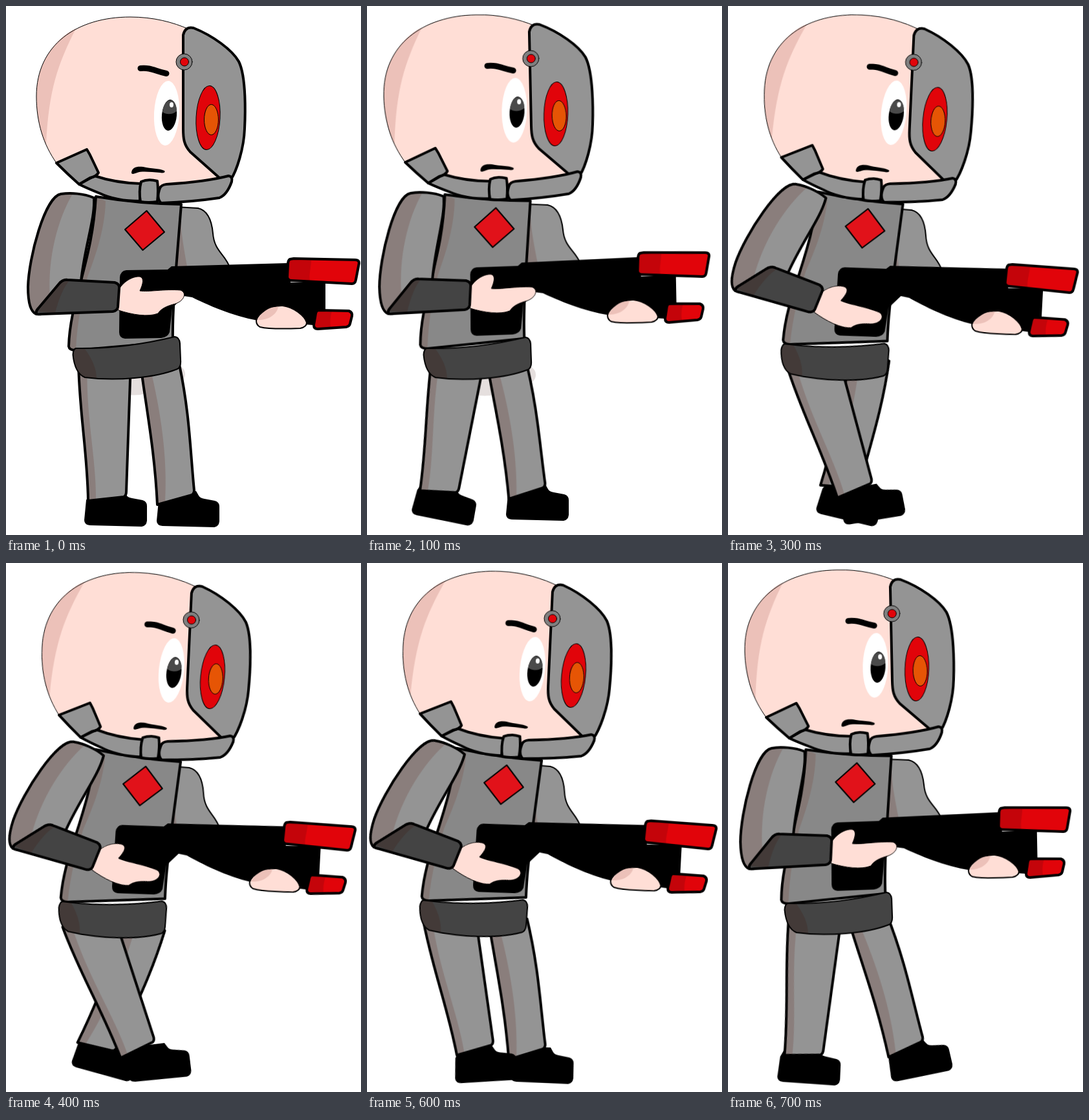
An HTML page that plays this animation: 549 by 819 pixels, repeating every 0.8 s.

```html
<!DOCTYPE html>
<html lang="en">
<head>
<meta charset="utf-8">
<title>Walking trooper</title>
<style>
html, body { margin: 0; width: 100%; height: 100%; overflow: hidden; background: #fff; }
svg { display: block; width: 100vw; height: 100vh; }
path, ellipse, circle { stroke-linejoin: round; stroke-linecap: round; }
.line { stroke: #000; stroke-width: 4; }
.mid { stroke: #000; stroke-width: 2; }
.thin { stroke: #000; stroke-width: 1; }
.metal { fill: #949494; }
.dark { fill: #444; }
.skin { fill: #ffded6; }
.blush { fill: #ecc1b9; }
.shade { fill: #8a7e7c; }
.deep { fill: #433a38; }
.red { fill: #e1040a; }
.wine { fill: #c4040a; }
.edge { fill: none; }

#body, #haze, .part, .limb { animation: 800ms step-end infinite; }
#body { animation-name: bob; }
#haze { animation-name: haze; }
.part { animation-name: sway; }

/* each part leans back, then holds the low pose */
@keyframes sway {
  0% { transform: none; }
  12.5%, 87.5% { transform: var(--lean); }
  25% { transform: var(--hold); }
}
@keyframes bob {
  0% { transform: none; }
  37.5% { transform: translate(-.5px, 2px); }
  50% { transform: translate(-1px, 3px); }
  62.5% { transform: translate(-1px, 2px); }
  75% { transform: translate(-1px, 1px); }
  87.5% { transform: translate(0, -3px); }
}
@keyframes haze {
  0% { transform: none; opacity: 1; }
  12.5% { transform: translate(-16px, 1px); opacity: 1; }
  25% { opacity: 0; }
}
#head { transform-origin: 220px 287px;
  --lean: translate(-18px, -4px) rotate(-1.2deg); --hold: translate(2.8px, -4.1px) rotate(2.64deg); }
#torso { transform-origin: 187px 530px;
  --lean: translate(-14.5px, -4px) rotate(-1deg); --hold: translate(-11.5px, -7px) rotate(3deg); }
#belt { transform-origin: 187px 546px;
  --lean: translate(-16px, .5px) rotate(.3deg); --hold: translate(-22px, 0) rotate(6.5deg); }
#farArm { transform-origin: 300px 350px;
  --lean: translate(-17px, -5px) rotate(-1deg); --hold: translate(-13.5px, 1px) rotate(1.5deg); }
#gun { transform-origin: 217px 440px;
  --lean: translate(-16px, -5px) rotate(-1.1deg); --hold: translate(-6.6px, -4.9px) rotate(3deg); }
#nearArm { transform-origin: 47px 476px;
  --lean: translate(-14px, -.5px) rotate(-1.1deg); --hold: translate(-35px, -38px) rotate(18deg); }

#nearLeg { transform-origin: 156px 763px; animation-name: nearLeg; }
#nearShoe { transform-origin: 122px 804px; animation-name: nearShoe; }
#farLeg { transform-origin: 262px 764px; animation-name: farLeg; }
#farShoe { transform-origin: 234px 805px; animation-name: farShoe; }

@keyframes nearLeg {
  0% { transform: none; }
  12.5% { transform: translate(-45px, -11px) rotate(9.2deg); }
  25% { transform: translate(31.5px, -17px) rotate(-14deg); }
  37.5% { transform: translate(40px, -13px) rotate(-17deg); }
  50% { transform: translate(47.5px, -9.5px) rotate(-20deg); }
  62.5% { transform: translate(30px, -9px) rotate(-15deg); }
  75% { transform: translate(11px, -9px) rotate(-10deg); }
  87.5% { transform: translate(-39.5px, -1px) rotate(5.8deg); }
}
@keyframes nearShoe {
  0% { transform: none; }
  12.5% { transform: translate(-53px, -17px) rotate(10deg); }
  25% { transform: translate(48px, 0) rotate(-15deg); }
  37.5% { transform: translate(59px, 0) rotate(-11deg); }
  50% { transform: translate(70px, 0) rotate(-7deg); }
  62.5% { transform: translate(43px, 1px) rotate(-6deg); }
  75% { transform: translate(16px, 2px) rotate(-5deg); }
  87.5% { transform: translate(-45px, -1px) rotate(2.5deg); }
}
@keyframes farLeg {
  0% { transform: none; }
  12.5% { transform: translate(-15px, -10px) rotate(-2.3deg); }
  25% { transform: translate(-52px, -23px) rotate(9.2deg); }
  37.5% { transform: translate(-90px, -20px) rotate(20deg); }
  50% { transform: translate(-123px, -15px) rotate(29deg); }
  62.5% { transform: translate(-68px, -14px) rotate(13deg); }
  75% { transform: translate(-15px, -4px) rotate(-1.5deg); }
  87.5% { transform: translate(12.7px, -11.5px) rotate(-9.5deg); }
}
@keyframes farShoe {
  0% { transform: none; }
  12.5% { transform: translate(-18px, -10px); }
  25% { transform: translate(-62px, -14px) rotate(10deg); }
  37.5% { transform: translate(-98px, -20px) rotate(12deg); }
  50% { transform: translate(-133px, -26px) rotate(14deg); }
  62.5% { transform: translate(-72px, -14px) rotate(8deg); }
  75% { transform: translate(-11px, -2px) rotate(1deg); }
  87.5% { transform: translate(21px, -1px) rotate(-13deg); }
}
</style>
</head>
<body>
<svg viewBox="0 0 549 819">
  <defs>
    <path id="shoe" d="M124 765L132 750H182L186 757Q188 761 195 762L211 765Q218 767 218 774V797Q217 805 210 806L130 804Q121 803 121 796Z"/>
  </defs>

  <g id="haze" fill="#e5dfde">
    <path d="M178 570V600Q200 605 215 600V570Z"/>
    <ellipse cx="265" cy="570" rx="12" ry="13"/>
  </g>

  <g id="farShoe" class="limb"><use href="#shoe" x="112" y="1"/></g>
  <g id="farLeg" class="limb">
    <path class="metal" d="M208 555C218 630 230 690 234 772L284 758Q291 757 291 750C285 690 284 630 268 555Z"/>
    <path class="shade" d="M208 555C218 630 230 690 234 772L246 768C250 700 240 630 222 556Z"/>
    <path class="edge line" d="M208 555C218 630 230 690 234 772L284 758Q291 757 291 750C285 690 284 630 268 555Z"/>
  </g>
  <g id="nearShoe" class="limb"><use href="#shoe"/></g>
  <g id="nearLeg" class="limb">
    <path class="metal" d="M112 545C112 620 126 690 127 766L182 760Q186 758 186 752L193 550Z"/>
    <path class="shade" d="M112 545C112 620 126 690 127 766L139 765C140 700 122 630 126 546Z"/>
    <path class="edge line" d="M112 545C112 620 126 690 127 766L182 760Q186 758 186 752L193 550Z"/>
  </g>

  <g id="body">
    <g id="farArm" class="part">
      <path class="metal mid" d="M262 311L297 313C310 316 318 330 320 352C322 380 340 385 346 405H260Z"/>
      <path class="shade" d="M271 313C268 340 276 380 280 403H261L262 313Z"/>
    </g>

    <g id="torso" class="part">
      <path fill="#888" d="M139 295C136 350 125 390 116 425C108 455 98 490 97 527Q98 533 108 533L258 520C257 470 262 420 271 307Q205 306 139 295Z"/>
      <path fill="#847875" d="M139 295L154 302C153 350 135 395 126 420C118 450 110 490 108 532L98 530C98 490 108 455 116 425C125 390 136 350 139 295Z"/>
      <path class="edge line" d="M139 295C136 350 125 390 116 425C108 455 98 490 97 527Q98 533 108 533L258 520C257 470 262 420 271 307Q205 306 139 295Z"/>
      <path class="mid" fill="#e1121a" d="M217.500 317L245 350L211.500 378L184 346Z"/>
    </g>

    <g id="gun" class="part">
      <path d="M186 409L250 408L256 403L437 398L440 428H494V470L475 494L390 487C350 480 310 462 288 451L275 449L257 468L253 505Q250 513 240 514L184 515Q175 514 175 505L176 420Q177 410 186 409Z"/>
      <path class="red" d="M439 392Q436 394 436 400L435 420Q436 425 441 425L535 430Q540 430 541 424L546 398Q546 393 540 393L445 391Z"/>
      <path class="wine" d="M438 393L472 394C472 404 468 415 470 426L437 423Z"/>
      <path class="edge line" d="M439 392Q436 394 436 400L435 420Q436 425 441 425L535 430Q540 430 541 424L546 398Q546 393 540 393L445 391Z"/>
      <path class="red" d="M484 471L530 472Q536 474 535 480L532 492Q531 496 526 497L482 500Q476 500 476 494L479 476Q480 471 484 471Z"/>
      <path class="wine" d="M481 472H504Q500 486 502 498L478 499Z"/>
      <path class="edge line" d="M484 471L530 472Q536 474 535 480L532 492Q531 496 526 497L482 500Q476 500 476 494L479 476Q480 471 484 471Z"/>
      <path class="skin mid" d="M387 487C390 475 410 463 428 464C445 466 462 480 465 490Q465 497 455 499C430 500 405 500 393 497Q387 494 387 487Z"/>
      <path class="blush" d="M389 486C395 473 410 464 421 466C418 480 402 487 389 486Z"/>
    </g>

    <g id="belt" class="part">
      <path class="dark" d="M108 530Q104 531 103.500 540C105 555 110 570 122 575C170 581 230 576 265 562Q271 559 270 548L269 522Q268 513 261 512C220 522 170 531 108 530Z"/>
      <path class="deep" d="M106 531L122 531C132 545 140 560 140 577L122 575C110 570 105 555 104 540Z"/>
      <path class="edge mid" d="M108 530Q104 531 103.500 540C105 555 110 570 122 575C170 581 230 576 265 562Q271 559 270 548L269 522Q268 513 261 512C220 522 170 531 108 530Z"/>
    </g>

    <g id="nearArm" class="part">
      <path class="metal" d="M85 291C100 289 120 290 136 297C138 330 122 370 116 426L47 477C38 474 34 460 34 435C35 390 60 295 85 291Z"/>
      <path class="shade" d="M85 291L103 291C80 330 64 390 68 450L47 476C38 474 34 460 34 435C35 390 60 295 85 291Z"/>
      <path class="edge line" d="M85 291C100 289 120 290 136 297C138 330 122 370 116 426L47 477C38 474 34 460 34 435C35 390 60 295 85 291Z"/>
      <path class="skin thin" d="M174 440C180 428 195 418 207 419C214 421 212 430 207 441C220 443 245 438 270 440C280 444 276 456 262 461C250 464 240 468 235 476C220 482 195 478 174 471Z"/>
      <path class="dark" d="M47 476Q46 472 50 468L82 430Q88 423 95 424L168 428Q176 430 175 437L173 466Q172 472 165 473L55 477Q48 478 47 476Z"/>
      <path class="deep" d="M49 473L84 428L98 425Q85 440 76 475Z"/>
      <path class="edge line" d="M47 476Q46 472 50 468L82 430Q88 423 95 424L168 428Q176 430 175 437L173 466Q172 472 165 473L55 477Q48 478 47 476Z"/>
    </g>

    <g id="head" class="part">
      <path class="skin" d="M78 243C58 215 47 180 47 140C47 60 110 17 192 17C228 17 258 25 283 36L340 275L230 300L113 274Z"/>
      <path class="blush" d="M108 35C80 90 66 130 62 215C52 195 47 165 47 140C47 90 75 50 108 35Z"/>
      <path class="edge thin" d="M78 243C58 215 47 180 47 140C47 60 110 17 192 17C228 17 258 25 283 36"/>

      <ellipse cx="248.500" cy="166" rx="19.500" ry="50" fill="#fff" transform="rotate(3 248.500 166)"/>
      <ellipse cx="252.500" cy="169" rx="11.500" ry="24" transform="rotate(5 252.500 169)"/>
      <path fill="#4a4a4a" d="M242 164C243 152 249 146 254 146C261 146 264 154 264 163C258 168 248 169 242 164Z"/>
      <ellipse cx="256" cy="153" rx="3" ry="4" fill="#fff"/>
      <path class="edge" stroke="#000" stroke-width="9" d="M208 96.500C225 95 230 101 248 104.500"/>
      <path d="M194 258C195 249 203 248 212 249C225 252 236 251 245 255C247 258 243 259 238 258C225 257 210 255 203 258C198 260 194 261 194 258Z"/>

      <path class="metal line" d="M274 45C276 36 281 32 290 34C320 46 350 68 360 86C372 110 370 170 369 190C368 220 357 255 347 270L330 266L285 226C275 215 274 205 274 190Z"/>
      <ellipse class="red thin" cx="312.500" cy="173" rx="18.500" ry="49.500" transform="rotate(3 312.500 173)"/>
      <ellipse class="thin" fill="#e65505" cx="317.500" cy="176" rx="11" ry="23.500"/>
      <circle class="thin" fill="#808080" cx="275.500" cy="86.500" r="12.500"/>
      <circle class="red thin" cx="276" cy="86.500" r="6.500"/>

      <g class="metal line">
        <path d="M113 276L137 263Q170 274 208 275L207 302Q170 302 145 290Q125 282 113 276Z"/>
        <path d="M78 243L125 222Q130 230 133 237L143 258Q140 264 130 266L113 276Q95 260 78 243Z"/>
        <path d="M238 282Q240 277 248 276Q310 272 344 263Q351 264 349 272Q342 292 330 297Q290 303 240 305Q232 298 238 282Z"/>
        <path d="M209 272Q220 267 234 271Q236 285 234 303Q220 305 208 303Q205 287 209 272Z"/>
      </g>
    </g>
  </g>
</svg>
</body>
</html>
```
